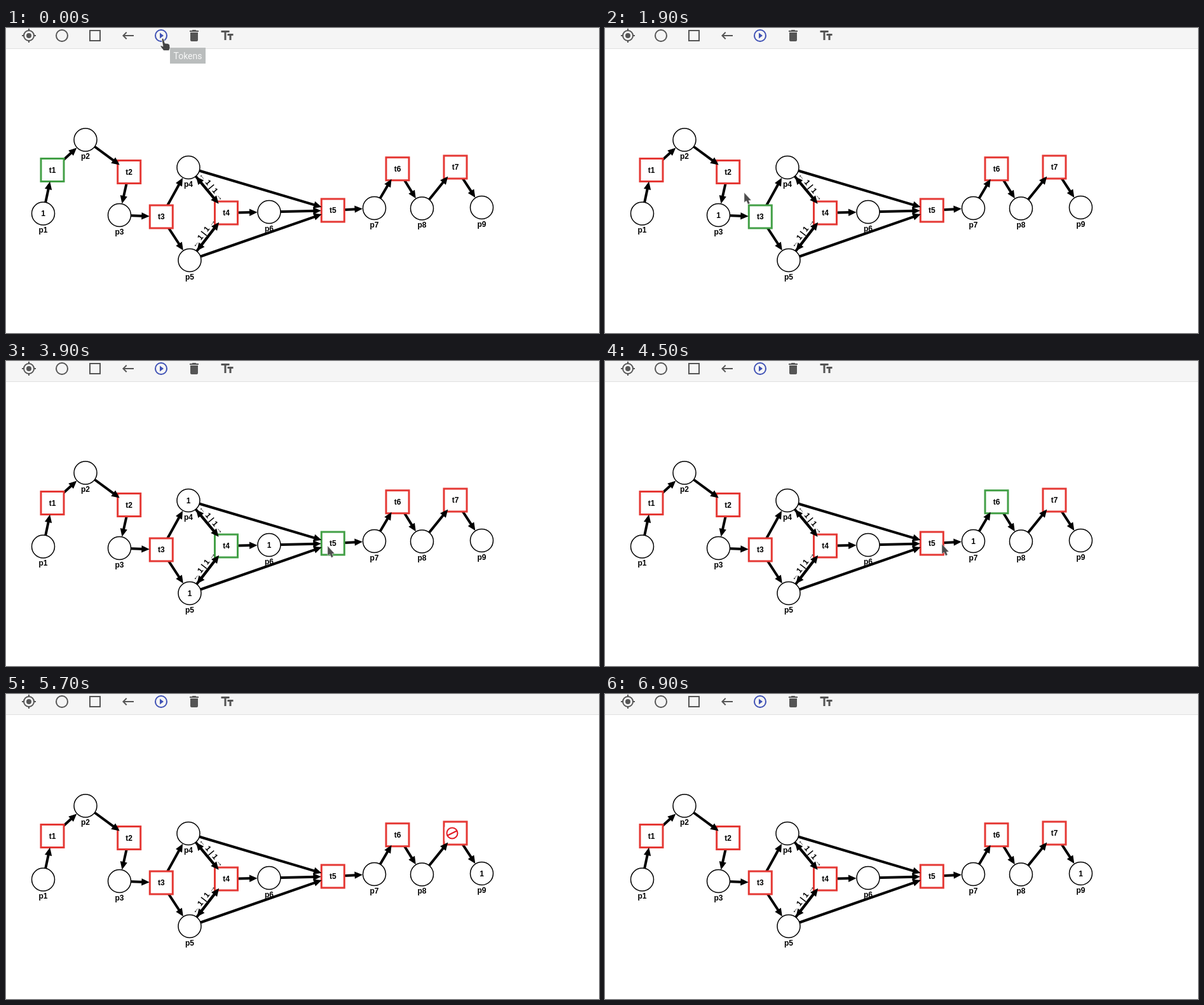
Animation, 933 px wide and 480 px high, one loop 7300 ms. Source, as an HTML page:

```html
<!DOCTYPE html>
<html lang="en">
<head>
<meta charset="utf-8">
<title>Petri net</title>
<style>
html, body { margin: 0; width: 100%; height: 100%; overflow: hidden; background: #fff; }
svg { display: block; }
text { font: bold 12px "Liberation Sans", Arial, sans-serif; text-anchor: middle; white-space: pre; }
.bar { fill: #555; stroke: none; }
.line { fill: none; stroke: #555; stroke-width: 2; }
#play .bar { fill: #3f51b5; }
#play .line { stroke: #3f51b5; }
#tip text { font: 14px Roboto, sans-serif; fill: #f7f7f7; }
</style>
</head>
<body>
<svg width="933" height="480" viewBox="0 0 933 480">
  <rect width="933" height="32" fill="#f5f5f5"/>
  <rect y="32" width="933" height="1" fill="#e0e0e0"/>
  <g transform="translate(24)">
    <circle class="bar" cx="12" cy="12" r="4"/>
    <circle class="line" cx="12" cy="12" r="8"/>
    <path class="line" d="M12 1v3M12 20v3M1 12h3M20 12h3"/>
  </g>
  <circle class="line" cx="88" cy="12" r="9"/>
  <rect class="line" x="132" y="4" width="16" height="16"/>
  <path class="bar" transform="translate(180)" d="M21 11H6.83l3.58-3.59L9 6l-6 6 6 6 1.41-1.41L6.83 13H21z"/>
  <g id="play" transform="translate(232)">
    <circle class="line" cx="12" cy="12" r="9"/>
    <path class="bar" d="M10 16.5l6-4.5-6-4.5z"/>
  </g>
  <path class="bar" transform="translate(284)" d="M6 19c0 1.1.9 2 2 2h8c1.1 0 2-.9 2-2V7H6zM19 4h-3.5l-1-1h-5l-1 1H5v2h14z"/>
  <path class="bar" transform="translate(336)" d="M2.5 4v3h5v12h3V7h5V4zM21.500 9h-9v3h3v7h3v-7h3z"/>
  <g id="net"></g>
  <g id="tip">
    <rect x="258" y="31" width="56" height="25" fill="#babdbd"/>
    <text x="286" y="48.500">Tokens</text>
  </g>
  <g id="hand" fill="#444" stroke="#fff" stroke-width=".7">
    <path d="M0 1.500Q1-.5 3 1L5 8l5 .5 2.500 2 .5 5-1.500 4H3L-2 13q0-2 2-1l2 1z"/>
  </g>
  <g id="arrow">
    <path d="M0 0V15.500L3.500 13 6 18.500 9 17 7 12.500 11 12z" fill="#4c4c4c" stroke="#ddd" stroke-width=".6"/>
  </g>
  <g id="wait">
    <rect x="-12.500" y="-4" width="25" height="8" rx="3" fill="#fff" opacity=".85"/>
    <path d="M-12 0l6-3.500v7zM12 0l-6-3.500v7z" fill="#555"/>
    <circle r="2.500" fill="#3fa9d8"/>
  </g>
  <g id="stop">
    <rect x="-12" y="-11" width="27" height="25" rx="3" fill="#fff"/>
    <circle r="8.500" fill="#fff" stroke="#e21b23" stroke-width="2"/>
    <path d="M-7 3.500L7-3.500" stroke="#e21b23" stroke-width="2"/>
  </g>
</svg>
<script>
const LOOP = 7300, STEP = 100;
const RED = '#e53935', GREEN = '#43a047';
const $ = id => document.getElementById(id);

const nodes = {
  p1: [58.5, 292], p2: [125, 176], p3: [178.5, 294.5], p4: [287, 219.5], p5: [289, 365.5],
  p6: [414, 289.5], p7: [579.5, 283.5], p8: [654.5, 284], p9: [748.5, 282.5],
  t1: [73, 223.5], t2: [193.7, 226.5], t3: [244.3, 297], t4: [346.5, 291],
  t5: [514.3, 287], t6: [616, 221.7], t7: [707, 219]
};
// Each transition: inputs, outputs, firing time
const rules = {
  t1: ['p1', 'p2', 1000],
  t2: ['p2', 'p3', 1600],
  t3: ['p3', 'p4 p5', 2200],
  t4: ['p4 p5', 'p4 p5 p6', 3300],
  t5: ['p4 p5 p6', 'p7', 4300],
  t6: ['p7', 'p8', 5100],
  t7: ['p8', 'p9', 5700]
};
// Pointer keys: time, shape, x, y; places between two arrows are interpolated
const track = [
  [0, 'hand', 245, 16], [100, 'arrow', 170, 119], [200, 'arrow', 95, 222], [300, 'arrow', 95, 222],
  [400, 'arrow', 68, 262], [500, 'arrow', 68, 262], [600, 'wait', 74.5, 235.5],
  [1100, 'arrow', 95, 226], [1300, 'arrow', 168, 222], [1400, 'arrow', 182, 222], [1500, 'wait', 192, 234],
  [1800, 'arrow', 195, 235], [2000, 'arrow', 243, 283], [2100, 'wait', 255.5, 294.5],
  [2700, 'wait', 345.5, 294.5], [3600, 'arrow', 380, 291], [3800, 'arrow', 535, 292],
  [3900, 'arrow', 506, 291], [4000, 'wait', 512.5, 302], [4500, 'arrow', 530, 288],
  [4700, 'arrow', 600, 235], [4800, 'wait', 618.5, 236.5], [5200, 'arrow', 635, 232],
  [5400, 'arrow', 692, 212], [5500, 'wait', 702, 219], [5700, 'stop', 702, 219],
  [6200, 'arrow', 695, 190], [6700, 'arrow', 640, -30], [6800, 'none', 0, 0]
];

function add(tag, attrs, label = '') {
  const el = document.createElementNS('http://www.w3.org/2000/svg', tag);
  for (const k in attrs) el.setAttribute(k, attrs[k]);
  el.textContent = label;
  return $('net').appendChild(el);
}

const arcs = [];
for (const t in rules) {
  const [ins, outs] = rules[t] = [rules[t][0].split(' '), rules[t][1].split(' '), rules[t][2]];
  ins.forEach(p => arcs.push([p, t]));
  outs.forEach(p => arcs.push([t, p]));
}

const geometry = arcs.map(([from, to]) => {
  const [x, y] = nodes[from], [u, v] = nodes[to];
  return { x, y, u, v, len: Math.hypot(u - x, v - y), deg: Math.atan2(v - y, u - x) * 180 / Math.PI };
});
const place = a => `translate(${a.x} ${a.y}) rotate(${a.deg})`;
geometry.forEach(a => add('path', {
  transform: place(a), d: `M0 0H${a.len - 26}`, stroke: '#000', 'stroke-width': 4
}));

const boxes = {}, tokens = {};
for (const id in nodes) {
  const [x, y] = nodes[id];
  if (id[0] === 'p') {
    add('circle', { cx: x, cy: y, r: 18, fill: '#fff', stroke: '#000', 'stroke-width': 1.5 });
    tokens[id] = add('text', { x, y: y + 4 }, '1');
  } else {
    boxes[id] = add('rect', { x: x - 18, y: y - 18, width: 36, height: 36, fill: '#fff', 'stroke-width': 3 });
    add('text', { x, y: y + 4 }, id);
  }
}
geometry.forEach(a => add('path', {
  transform: place(a), d: `M${a.len - 18.5} 0l-12.5 -5.7v11.4z`
}));
for (const id in nodes) {
  if (id[0] === 'p') add('text', { x: nodes[id][0], y: nodes[id][1] + 30 }, id);
}
// Two-way arcs carry a weight label
arcs.forEach(([from, to], i) => {
  if (to === 't4') add('text', { transform: place(geometry[i]), x: geometry[i].len / 2, y: -5 }, '← 1 | 1 →');
});

function drawNet(time) {
  const marked = new Set(['p1']);
  for (const t in rules) {
    const [ins, outs, at] = rules[t];
    if (time < at) continue;
    ins.forEach(p => marked.delete(p));
    outs.forEach(p => marked.add(p));
  }
  for (const p in tokens) tokens[p].style.display = marked.has(p) ? '' : 'none';
  for (const t in boxes) boxes[t].setAttribute('stroke', rules[t][0].every(p => marked.has(p)) ? GREEN : RED);
}

function drawPointer(time) {
  let i = track.length - 1;
  while (track[i][0] > time) i--;
  const [at, shape, x, y] = track[i], next = track[i + 1];
  const k = next && shape === 'arrow' && next[1] === 'arrow' ? (time - at) / (next[0] - at) : 0;
  const px = k ? x + (next[2] - x) * k : x, py = k ? y + (next[3] - y) * k : y;
  for (const id of ['hand', 'arrow', 'wait', 'stop']) {
    $(id).style.display = id === shape ? '' : 'none';
    $(id).setAttribute('transform', `translate(${px} ${py})`);
  }
  $('tip').style.display = shape === 'hand' ? '' : 'none';
}

function frame() {
  const time = Math.floor(performance.now() % LOOP / STEP) * STEP;
  drawNet(time);
  drawPointer(time);
  requestAnimationFrame(frame);
}
frame();
</script>
</body>
</html>
```
